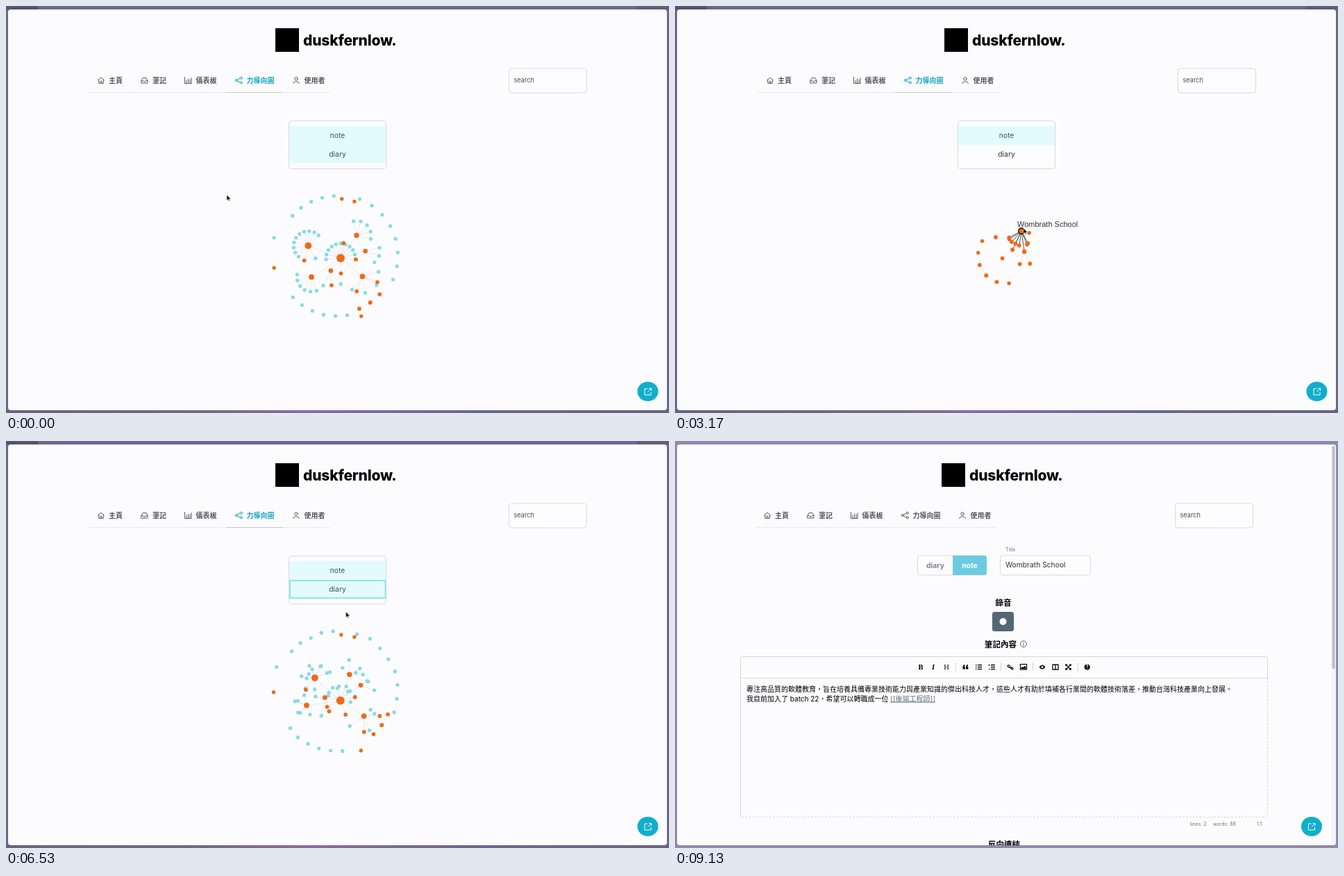
Animation, 955 px wide and 586 px high, one loop 9.16 s. Source, as an HTML page:

```html
<!DOCTYPE html>
<html lang="zh-Hant">
<head>
<meta charset="utf-8">
<title>Note graph</title>
<style>
  html, body { margin: 0; width: 100%; height: 100%; overflow: hidden; background: #6d6889; }
  svg { display: block; width: 955px; height: 586px; font: 10px Inter, "Noto Sans CJK TC", "Noto Sans CJK", sans-serif; }
  .bold { font-weight: 700; }
  .nav text { font-weight: 700; fill: #55565c; }
  .icon { fill: none; stroke: #5c5d63; stroke-width: 1; stroke-linejoin: round; stroke-linecap: round; }
  .active text { fill: #12a5c1; }
  .active .icon { stroke: #12a5c1; }
  .dark { fill: none; stroke: #111; stroke-width: 1.3; }
  .box { fill: #fdfdff; stroke: #d9d9df; }
  .mid { text-anchor: middle; }
  .head { font-size: 11.6px; font-weight: 700; text-anchor: middle; }
  .tiny { font-size: 7px; fill: #777; }
  .tip { font: 11px "Liberation Sans", Arial, sans-serif; fill: #333; }
</style>
</head>
<body>
<svg viewBox="0 0 955 586">
  <defs>
    <clipPath id="page"><rect x="3" y="5" width="949" height="577" rx="4"/></clipPath>
    <linearGradient id="edge">
      <stop offset="0" stop-color="#67637f"/><stop offset=".3" stop-color="#746a80"/>
      <stop offset=".45" stop-color="#8a6ba4"/><stop offset=".7" stop-color="#6c6790"/>
      <stop offset="1" stop-color="#67637f"/>
    </linearGradient>
  </defs>
  <rect id="frame" width="955" height="586"/>
  <g id="shade">
    <rect width="46" height="5" fill="#56526f"/><rect x="909" width="46" height="5" fill="#625d7c"/>
    <rect y="581" width="955" height="5" fill="url(#edge)"/>
  </g>
  <rect x="3" y="5" width="949" height="577" rx="4" fill="#fcfcfe"/>

  <g clip-path="url(#page)">
    <g id="header">
      <rect x="388" y="32" width="34" height="34"/>
      <text x="428" y="56.5" font-size="21" font-weight="800" letter-spacing="-.2">duskfernlow.</text>
      <path d="M120 124.5H468" stroke="#e3e3e9" stroke-dasharray="3 1"/>
      <path id="underline" d="M317 124.5H399" stroke="#c6c8b8"/>
      <g class="nav">
        <path class="icon" d="M132.5 107L137 103L141.5 107M133.7 106V111.3H140.3V106M136 111V108.3H138V111"/>
        <text x="148" y="110.7">主頁</text>
        <path class="icon" d="M195 107.5L197 103.5H202L204 107.5V111H195ZM195 107.5H197.5L198.3 109H200.7L201.5 107.5H204"/>
        <text x="211" y="110.7">筆記</text>
        <path class="icon" d="M257.5 102.5V111.5H267M260 111V107M262.5 111V105M265 111V106M267 111V103.5"/>
        <text x="273.5" y="110.7">儀表板</text>
        <g id="graphTab">
          <path class="icon" d="M333 106.3L337 104.3M333 107.7L337 109.7"/>
          <circle class="icon" cx="331.7" cy="107" r="1.6"/>
          <circle class="icon" cx="338.7" cy="103.7" r="1.6"/>
          <circle class="icon" cx="338.7" cy="110.3" r="1.6"/>
          <text x="346.5" y="110.7">力導向圖</text>
        </g>
        <circle class="icon" cx="418" cy="104.7" r="2.2"/>
        <path class="icon" d="M413.5 111.5Q414 108.7 418 108.7T422.5 111.5"/>
        <text x="429.5" y="110.7">使用者</text>
      </g>
      <rect class="box" x="724.5" y="90" width="112" height="35" rx="4"/>
      <text x="731.5" y="110.3" font-size="9.2" fill="#4b4c52">search</text>
    </g>

    <g id="graphPage">
      <rect class="box" x="407.5" y="165.5" width="140" height="69" rx="4"/>
      <rect x="408" y="173" width="139" height="27" fill="#e4fbfe"/>
      <rect id="diaryFill" x="408" y="200" width="139" height="26.5" fill="#e4fbfe"/>
      <rect id="ring" x="409" y="201" width="137.5" height="25" fill="none" stroke="#92e4f1" stroke-width="2"/>
      <text class="mid" x="477.5" y="189.8" font-size="10.2" fill="#1f5b66">note</text>
      <text class="mid" id="diaryText" x="477.5" y="216.5" font-size="10.4">diary</text>
      <g id="links"></g>
      <g id="nodes"></g>
      <text id="tip" class="tip"></text>
    </g>

    <g id="notePage">
      <rect class="box" x="349.5" y="165" width="99" height="28" rx="3"/>
      <path d="M400 165H446Q449 165 449 168V190Q449 193 446 193H400Z" fill="#6ccbe0"/>
      <text class="mid bold" x="375" y="182.5" font-size="10.4" fill="#85868c">diary</text>
      <text class="mid bold" x="424.5" y="182.5" font-size="10.4" fill="#fff">note</text>
      <text class="tiny" x="476" y="158.5">Title</text>
      <rect class="box" x="468.5" y="165" width="130" height="28" rx="3"/>
      <text x="476" y="182.3" font-size="10.3" fill="#333">Wombrath School</text>
      <text class="head" x="473" y="237">錄音</text>
      <rect x="457" y="246" width="31" height="28" rx="3.5" fill="#536777"/>
      <circle cx="472.5" cy="260" r="5" fill="#fff"/>
      <text class="head" x="469" y="296.5">筆記內容</text>
      <circle class="icon" cx="502" cy="292.3" r="4.4"/>
      <path class="icon" d="M502 292V294.5M502 290V290.2"/>

      <path d="M94.5 541V313Q94.5 310.5 97 310.5H851Q853.5 310.5 853.5 313V341.5H94.5" fill="none" stroke="#d9d9da"/>
      <path d="M853.5 341V541.5H94.5" fill="none" stroke="#d6d8d4" stroke-dasharray="3 2"/>
      <path d="M404.5 319V331M469.5 319V331M515.5 319V331M580.5 319V331" stroke="#d3d3d8"/>
      <g font-family="Liberation Serif, serif" font-size="10.5" class="mid">
        <text class="bold" x="354" y="329">B</text>
        <text class="bold" x="372" y="329" font-style="italic">I</text>
        <text x="391" y="329">H</text>
      </g>
      <path d="M414.5 326Q414.5 322 417.5 322V323.5Q416.5 324 416.5 325H417.8V328.5H414.5ZM419 326Q419 322 422 322V323.5Q421 324 421 325H422.3V328.5H419Z"/>
      <path class="dark" d="M436 322.5H442M436 325.5H442M436 328.5H442M433 322.5H434.5M433 325.5H434.5M433 328.5H434.5"/>
      <path class="dark" d="M455 322.5H461M455 325.5H461M455 328.5H461M452.5 321.5V324M452 328.5H453.5"/>
      <path class="dark" d="M483 324.5L481.5 323Q480 322 479.3 323.3T481 326H485.5Q487.5 327 486.7 328.3T484.5 328L483.2 326.7"/>
      <rect class="dark" x="497.5" y="321.5" width="9" height="7.5"/>
      <path d="M498.5 328V326.5L500.5 325L502 326L504 323.7L505.5 325.5V328Z"/>
      <path d="M524.5 325.5Q529 319.5 533.5 325.5Q529 331.5 524.5 325.5Z"/><circle cx="529" cy="325.5" r="1.5" fill="#fff"/>
      <path class="dark" d="M544 322H552V329H544ZM548 322V329"/>
      <path class="dark" d="M563.5 322.5L569.5 328.5M569.5 322.5L563.5 328.5M562.8 324V322H565M568 322H570.2V324M562.8 327V329H565M568 329H570.2V327"/>
      <circle cx="593.7" cy="325.5" r="4"/>
      <text class="mid bold" x="593.7" y="328" font-size="7" fill="#fff">?</text>

      <text x="103" y="360.5">專注高品質的軟體教育，旨在培養具備專業技術能力與產業知識的傑出科技人才，這些人才有助於填補各行業間的軟體技術落差，推動台灣科技產業向上發展。</text>
      <text x="103" y="374.5">我目前加入了 batch 22，希望可以轉職成一位 <tspan fill="#5f7380" text-decoration="underline">[[後端工程師]]</tspan></text>
      <text class="tiny" x="742" y="554">lines: 2</text>
      <text class="tiny" x="775" y="554">words: 88</text>
      <text class="tiny" x="838" y="554">1:1</text>
      <text class="head" x="474" y="584.5">反向連結</text>
      <rect x="945" y="5" width="7" height="577" fill="#f5f5f7"/>
      <rect x="946.5" y="7" width="4" height="321" rx="2" fill="#bfbfc3"/>
    </g>

    <g id="fab">
      <ellipse cx="924.5" cy="555" rx="15" ry="14" fill="#11aecb"/>
      <path d="M924 551H920V560H929V556M926 550.5H929.5V554M929.5 550.5L924.5 555.5" fill="none" stroke="#fff"/>
    </g>
  </g>
  <g id="cursor">
    <path id="arrow" d="M0 0V8L2 6.3L3.2 9L4.4 8.5L3.2 5.9H5.8Z" fill="#111" stroke="#fff" stroke-width=".4"/>
    <path id="hand" d="M-.5 0Q.5 -1 1 .3L1.6 3L5 3.8Q6 4.2 5.5 6L5 8H1.5L-1.5 5Q-1.5 4 0 4.7Z" fill="#fff" stroke="#222" stroke-width=".9"/>
  </g>
</svg>
<script>
const LOOP = 9160, HIDE = 1100, GRAB = 2300, SHOW = 5750, BURST = 5970, CALM = 7330, OPEN = 7450;
const CENTER = [476.5, 359.5];
const $ = id => document.getElementById(id);

const mix = (a, b, u) => a + (b - a) * u;
const mixPoint = (p, q, u) => [mix(p[0], q[0], u), mix(p[1], q[1], u)];
const polar = ([x, y], r, deg) => [x + r * Math.cos(deg * Math.PI / 180), y + r * Math.sin(deg * Math.PI / 180)];
const clamp = (v, lo, hi) => Math.min(hi, Math.max(lo, v));
const linear = u => u;
const smooth = u => u * u * (3 - 2 * u);
const settle = u => (1 - Math.exp(-5 * u)) / (1 - Math.exp(-5));
const progress = (t, from, to, ease) => ease(clamp((t - from) / (to - from), 0, 1));

// Keys are [time, point, easing into it].
function path(keys, t) {
  let i = 1;
  while (i < keys.length - 1 && t > keys[i][0]) i++;
  const [t0, p] = keys[i - 1], [t1, q, ease = smooth] = keys[i];
  return mixPoint(p, q, progress(t, t0, t1, ease));
}

// The tree: fans of nodes around a parent, or around the centre if it has none.
// `turn` is how far a fan has rotated once the graph has grown again.
const nodes = [];
function fan(parent, count, r, start, step, turn, diary = false) {
  const made = Array.from({ length: count }, (_, i) => ({ parent, r, angle: start + i * step, turn, diary }));
  nodes.push(...made);
  return made;
}
const leaves = (parent, count, start, step, turn, r = 21) => fan(parent, count, r, start, step, turn, true);

const [root] = fan(null, 1, 0, 0, 0, 0);
const [left] = fan(root, 1, 50, 201, 0, 23);
const [low] = fan(root, 1, 50, 147, 0, 28);
const [top_] = fan(root, 1, 40, -55, 0, -18);
const [right] = fan(root, 1, 37, -16, 0, -24);
const [base] = fan(root, 1, 41, 40, 0, -7);
const [core] = fan(root, 1, 23, 128, 0, 71);
const [north, east, south] = fan(root, 3, 22, -79, 84, 75);
const [demo] = fan(left, 1, 22, 105, 0, 23);
const twigs = fan(base, 2, 23, 21, 90, -25);
const [bud] = fan(core, 1, 21, 87, 0, -17);
const chain = fan(null, 3, 83, 42, 12.5, -20);
const crest = fan(null, 2, 82, 275, 13, 0);
const [foot] = fan(null, 1, 94, 68, 0, 0);
const [west] = fan(null, 1, 92, 169, 0, 11);

leaves(root, 10, 175, 19, 25);
leaves(left, 10, -45, -20.4, 25);
leaves(left, 1, 60, 0, 35);
leaves(low, 6, 190, -24, 40);
leaves(top_, 5, -102, 29, -7);
leaves(right, 3, -13, 32, -33);
leaves(base, 4, -16, 48, -14, 24);
leaves(core, 2, 117, -64, 60, 24);
leaves(null, 8, -68, 13, -3, 88);
leaves(null, 6, 80, 11.3, 6, 87);
leaves(null, 1, 196, 0, 7, 94);
leaves(null, 5, 222, 11.3, -1, 86);

// Where the notes rest while the diary is hidden.
const rest = (list, on, r, start, step) => list.forEach((n, i) => n.rest = { on, r, angle: start + i * step });
rest([north, low, core, south, base, east, right, top_, left], root, 20, 210, -41);
rest(twigs, base, 19, 65, 45);
rest([bud], core, 19, 140, 0);
rest([crest[0], west, ...chain, foot], null, 40, 217, -25.7);
rest([crest[1]], null, 47, -39, 0);
core.slack = base.slack = 9;

// Where diary nodes scatter when they come back: a sunflower, or a rough ring.
let seed = 7;
const random = () => (seed = seed * 16807 % 2147483647) / 2147483647;
nodes.filter(n => n.diary).forEach((n, i) => {
  n.spot = n.parent ? polar(CENTER, 9 * Math.sqrt(i + .5), i * 137.508) : polar(CENTER, n.r * mix(.85, 1.1, random()), n.angle);
});

const links = nodes.filter(n => n.parent).map(n => [n.parent, n])
  .concat([[chain[0], chain[1]], [chain[1], chain[2]]]);
const size = (n, full) => n.diary ? 2.7 :
  2.7 + .17 * links.filter(l => l.includes(n) && (full || !l[1].diary)).length;
for (const n of nodes) n.size = [size(n, false), size(n, true)];

const HOME = [491, 351];
const rootPath = [[HIDE, [482, 363]], [1930, HOME, settle], [GRAB, HOME], [3100, [499, 324]], [3400, [499, 324]],
  [4500, [493, 335]], [SHOW, [493, 335]], [BURST, [487, 365]], [CALM, [481, 375], settle]];
const demoPath = [[GRAB, [470, 345]], [3100, [462, 333]], [4500, [458, 326]]];
const cursorPath = [[150, [318, 272]], [950, [490, 215]], [1350, [490, 215]], [1930, [495, 299]],
  [GRAB, [492, 350]], [3100, [502, 320]], [3450, [502, 320]], [4200, [462, 330]], [4500, [457, 325]],
  [4850, [457, 325]], [5550, [491, 218]], [6300, [491, 218]], [7150, [483, 372]]];

function fullAt(n, t) {
  if (n === root) return path(rootPath, t);
  return polar(n.parent ? fullAt(n.parent, t) : CENTER, n.r, n.angle + n.turn * progress(t, BURST, CALM, settle));
}

// Neighbours of the root hang on a short leash, so they trail behind a drag.
function notesAt(n, t) {
  if (n === root) return path(rootPath, t);
  if (n === demo) return path(demoPath, t);
  const { on, r, angle } = n.rest;
  if (on !== root) return polar(on ? notesAt(on, t) : CENTER, r, angle - (on ? 0 : 15 * progress(t, GRAB, 4500, smooth)));
  const hub = path(rootPath, t), [ax, ay] = polar(HOME, r, angle);
  const dx = ax - hub[0], dy = ay - hub[1];
  return polar(hub, clamp(Math.hypot(dx, dy), 20, 21 + (n.slack || 0)), Math.atan2(dy, dx) * 180 / Math.PI);
}

function nodeAt(n, t) {
  const grown = progress(t, BURST, CALM, settle);
  if (n.diary) {
    if (t < SHOW) return fullAt(n, t);
    const spot = mixPoint(CENTER, n.spot, mix(.35, 1, progress(t, SHOW, BURST, linear)));
    return mixPoint(spot, fullAt(n, t), grown);
  }
  const spread = t < SHOW ? 1 - progress(t, HIDE, 1930, settle) : mix(.85 * progress(t, SHOW, BURST, linear), 1, grown);
  return mixPoint(notesAt(n, t), fullAt(n, t), spread);
}

const make = (tag, host) => host.appendChild(document.createElementNS("http://www.w3.org/2000/svg", tag));
const set = (el, attrs) => { for (const k in attrs) el.setAttribute(k, attrs[k]); };
const show = (el, on) => { el.style.display = on ? "" : "none"; };
const lines = links.map(() => make("line", $("links")));
for (const n of [...nodes].reverse()) n.dot = make("circle", $("nodes"));

function drawGraph(t) {
  const full = t < HIDE || t >= SHOW;
  const hover = t > 2250 && t < 3600 || t > 7080 ? root : t > 4200 && t < 4950 ? demo : null;
  for (const n of nodes) {
    n.at = nodeAt(n, t);
    show(n.dot, full || !n.diary);
    set(n.dot, { cx: n.at[0], cy: n.at[1], r: n.size[+full], fill: n.diary ? "#8adbe5" : "#ed6a18",
      stroke: n === hover ? "#111" : "none", "stroke-width": 1.4 });
  }
  links.forEach(([a, b], i) => {
    const lit = a === hover || b === hover;
    show(lines[i], full || !b.diary);
    set(lines[i], { x1: a.at[0], y1: a.at[1], x2: b.at[0], y2: b.at[1],
      stroke: lit ? "#444" : "#d6d6da", "stroke-width": lit ? .9 : .7, "stroke-dasharray": lit ? "none" : "2 1" });
  });
  show($("tip"), hover);
  if (hover) {
    $("tip").textContent = hover === demo ? "Demo" : "Wombrath School";
    set($("tip"), { x: hover.at[0] - 6, y: hover.at[1] - 6 });
  }
  show($("diaryFill"), full);
  show($("ring"), t >= HIDE && t < GRAB || t >= SHOW);
  set($("diaryText"), { fill: full ? "#1f5b66" : "#333" });

  const [x, y] = path(cursorPath, t);
  const overMenu = x > 408 && x < 547 && y > 165 && y < 235;
  set($("cursor"), { transform: `translate(${x} ${y})` });
  show($("hand"), overMenu);
  show($("arrow"), !overMenu);
}

function draw(t) {
  const open = t >= OPEN;
  show($("notePage"), open);
  for (const id of ["graphPage", "cursor", "underline", "shade"]) show($(id), !open);
  set($("frame"), { fill: open ? "#8f8aac" : "#6d6889" });
  set($("graphTab"), { class: open ? "" : "active" });
  set($("header"), { transform: `translate(${open ? -4 : 0} 0)` });
  set($("fab"), { transform: `translate(${open ? -7.5 : 0} 0)` });
  if (!open) drawGraph(t);
}

const start = performance.now();
function tick() {
  draw((performance.now() - start) % LOOP);
  requestAnimationFrame(tick);
}
tick();
</script>
</body>
</html>
```
